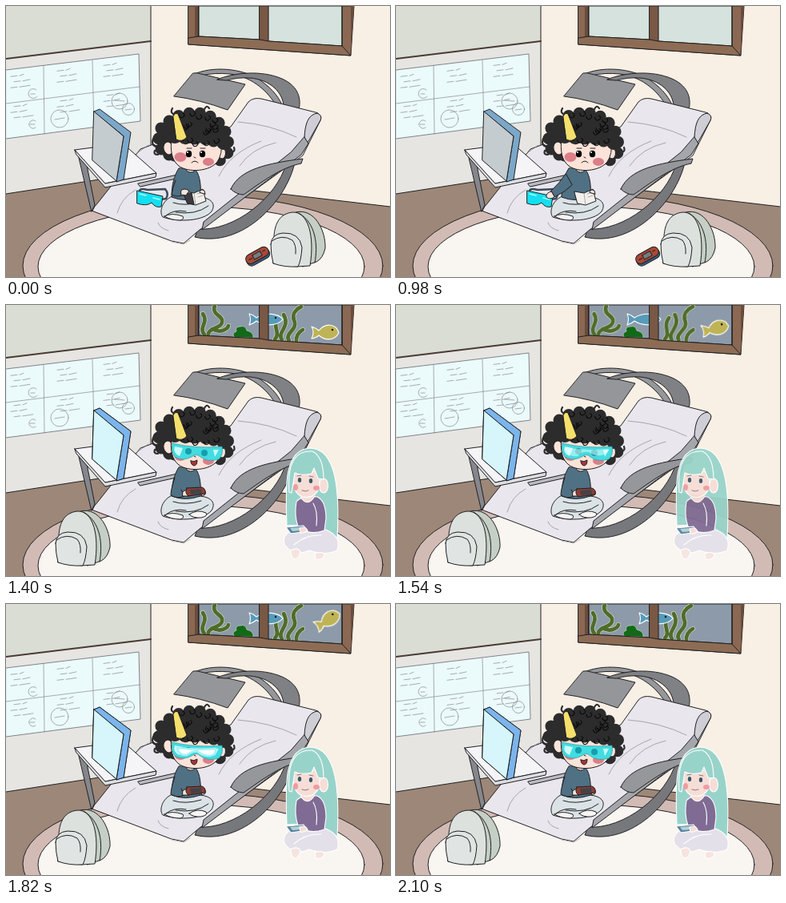
An HTML page that plays this animation: 480x339 px, repeating every 2.24 s.

```html
<!DOCTYPE html>
<html lang="en">
<head>
<meta charset="utf-8">
<title>Reading and playing</title>
<style>
html, body { margin: 0; width: 100%; height: 100%; overflow: hidden; background: #f8efe5; }
svg { display: block; width: 100vw; height: 100vh; }
path, ellipse, circle { stroke-linejoin: round; stroke-linecap: round; }
.ink { stroke: #202022; stroke-width: 1; }
.thin { stroke: #77777d; stroke-width: .6; fill: none; }
.none { fill: none; }
.glow { stroke: #fff; stroke-width: 1.1; }
.skin { fill: #fbe3d9; }
.shirt { fill: #507084; }
.pants { fill: #dbe3e7; }
.metal { fill: #96979b; }
.cloth { fill: #e9e7ed; }
.cyan { fill: #14dff0; }

/* One loop is 16 ticks of 140 ms, 6.25% each. */
.t { animation: 2240ms step-end infinite; }
.day { animation-name: day; }
.play { animation-name: play; }
.read { animation-name: read; }
.turn { animation-name: turn; }
.reach { animation-name: reach; }
.lift { animation-name: lift; }
.rest { animation-name: rest; }
.girl { animation-name: girl; }
.tap { animation-name: tap; }
.shine { animation-name: shine; }
.wide { animation-name: wide; }
.blue { animation-name: blue; }
.gold { animation-name: gold; }
.weed { animation-name: weed; transform-origin: 300px 40px; }
@keyframes day { 0% { opacity: 1 } 62.5%, 100% { opacity: 0 } }
@keyframes play { 0% { opacity: 0 } 62.5%, 100% { opacity: 1 } }
@keyframes read { 0% { opacity: 1 } 37.5%, 100% { opacity: 0 } }
@keyframes turn { 0% { opacity: 0 } 37.5% { opacity: 1 } 43.75%, 100% { opacity: 0 } }
@keyframes reach { 0% { opacity: 0 } 43.75% { opacity: 1 } 50%, 100% { opacity: 0 } }
@keyframes lift { 0% { opacity: 0 } 50% { opacity: 1 } 62.5%, 100% { opacity: 0 } }
@keyframes rest { 0% { opacity: 1 } 50%, 100% { opacity: 0 } }
@keyframes girl { 0% { opacity: 1 } 68.75% { opacity: .95 } 75% { opacity: .9 } 81.25%, 100% { opacity: 1 } }
@keyframes tap { 0% { transform: none } 68.75%, 87.5% { transform: translateY(1px) } 75%, 93.75%, 100% { transform: none } }
@keyframes shine { 0% { opacity: 0 } 68.75% { opacity: .5 } 75% { opacity: 1 } 81.25% { opacity: 0 } 87.5% { opacity: .5 } 93.75%, 100% { opacity: 0 } }
@keyframes wide { 0% { opacity: 0 } 81.25% { opacity: 1 } 87.5%, 100% { opacity: 0 } }
@keyframes blue {
  0%, 62.5%, 81.25%, 93.75%, 100% { transform: translate(325px, 18px) }
  68.75%, 87.5% { transform: translate(310px, 18px) }
  75% { transform: translate(294px, 18px) }
}
@keyframes gold {
  0%, 62.5% { transform: translate(399px, 34px) }
  68.75% { transform: translate(399px, 29px) rotate(-12deg) }
  75% { transform: translate(398px, 24px) rotate(-24deg) }
  81.25% { transform: translate(402px, 20px) rotate(-30deg) }
  87.5% { transform: translate(412px, 12px) rotate(-30deg) }
  93.75%, 100% { transform: translate(450px, 0) }
}
@keyframes weed {
  0%, 62.5%, 81.25%, 93.75%, 100% { transform: none }
  68.75%, 87.5% { transform: skewX(-3deg) }
  75% { transform: skewX(-6deg) }
}
</style>
</head>
<body>
<svg viewBox="0 0 480 339" preserveAspectRatio="none">
  <defs>
    <g id="bag" class="ink" stroke-width=".8">
      <path d="M362 258C386 252 400 282 399 303Q396 316 388 320L371 326Z" fill="#c5cfc5"/>
      <path d="M335 288C336 272 342 260 358 258C378 257 386 288 380 325L363 326L334 322Z" fill="#dde1dd"/>
      <path d="M366 259C388 272 390 300 386 321" class="none"/>
      <path d="M331 298Q332 285 346 284Q367 283 370 302Q369 318 365 326Q348 327 334 322Q331 310 331 298Z" fill="#e0e5e4"/>
      <path d="M332 294Q345 285 358 293Q363 299 362 310" class="none"/>
    </g>
    <path id="weeds" d="M248 37C240 28 254 22 246 11M253 38C251 28 272 30 270 19C269 12 257 13 261 0M258 30C268 36 277 30 278 26M336 43C344 35 332 27 340 16M345 44C338 34 356 28 347 12M354 45C347 35 366 31 360 19C357 11 363 5 369 2M363 46Q362 36 371 31"/>
    <path id="panes" d="M241 0H317V42L241 38ZM328 0H420V50L328 44Z"/>
    <clipPath id="glass"><use href="#panes"/></clipPath>
  </defs>

  <!-- Room -->
  <path d="M0 0H181V235H0Z" fill="#e6e5e2"/>
  <path d="M0 0H181V44L0 66Z" fill="#d9ddd4"/>
  <path d="M0 235L181 207L310 231L480 251V339H0Z" fill="#9d8778"/>
  <path d="M0 235L181 207M310 231L480 251M181 0V180" class="ink none"/>
  <path d="M0 66L181 44" stroke="#4a3a33" stroke-width="2"/>
  <ellipse cx="246" cy="325" rx="225" ry="88" fill="#d2bbb4" class="ink"/>
  <ellipse cx="244" cy="326" rx="204" ry="75" fill="#f9f5f1" class="ink"/>

  <!-- Wall chart -->
  <path d="M0 80L166 60L168 144L0 166Z" fill="#ebfafb" stroke="#55555c" stroke-width=".7"/>
  <path d="M47 75L48 160M108 68L110 152M0 122L167 101" class="thin"/>
  <g class="thin">
    <path d="M38 105a6 6 0 1 0 1 8M37 144a5 5 0 1 0 0 8"/>
    <circle cx="67" cy="141" r="11"/><circle cx="142" cy="119" r="10"/><circle cx="153" cy="129" r="7.5"/>
    <path d="M31 110h5M30 148h6M61 142l12-2M136 118l12 1M149 130l8-1"/>
  </g>
  <g id="notes" class="thin"></g>

  <!-- Window -->
  <path d="M228 0H435L431 62L228 48Z" fill="#8a6853" class="ink"/>
  <path d="M236 0H241V38L236 41ZM431 0H435L431 62Z" fill="#6b4c3c"/>
  <use href="#panes" fill="#d5e2dd" class="ink"/>
  <g class="t play">
    <use href="#panes" fill="#8d9aa9" class="ink"/>
    <g clip-path="url(#glass)">
      <g class="t weed" fill="none">
        <use href="#weeds" stroke="#dce2cf" stroke-width="6"/>
        <use href="#weeds" stroke="#4f6c2b" stroke-width="4.8"/>
      </g>
      <path d="M285 40Q282 35 288 33Q286 27 293 27Q299 25 301 32Q310 34 309 41Z" fill="#126a18" stroke="#dce2cf" stroke-width=".6"/>
      <g class="t gold">
        <path d="M-17 -7Q-11 -5 -8 -2C0 -12 14 -11 17 1C11 12 -1 10 -8 4Q-11 7 -17 8Q-13 0 -17 -7Z" fill="#bfb455" class="glow"/>
        <circle cx="9" cy="-3" r="1.2"/>
      </g>
    </g>
    <g class="t blue">
      <path d="M21 0C15 -8 -1 -9 -12 -2Q-16 -6 -21 -7Q-18 0 -21 7Q-15 5 -12 2C-1 9 15 8 21 0Z" fill="#569bb9" class="glow"/>
      <circle cx="12" cy="-2" r="1.2"/>
    </g>
  </g>
  <path d="M317 0H328V48L317 47Z" fill="#795844" class="ink"/>
  <path d="M228 40L241 38L317 42L328 44L420 50L431 62L228 48Z" fill="#8d6c55" class="ink"/>
  <path d="M420 0V50M241 0V38" class="ink"/>

  <!-- Rocking lounger -->
  <path d="M350 198C338 240 285 282 240 279L236 289C295 303 350 245 361 196Z" fill="#77787c" class="ink"/>
  <path d="M238 84C265 74 300 80 318 93C335 105 342 116 346 126L336 122C325 104 305 88 280 85Q260 83 245 87Z" class="metal ink"/>
  <path d="M234 84Q239 83 244 85L299 98L277 130Q242 117 210 113Z" fill="#95969a" class="ink"/>
  <path d="M264 92C285 83 320 80 345 91C363 99 370 113 366 130L347 125C346 108 330 92 305 90Q289 89 276 93Z" fill="#808185" class="ink"/>
  <path d="M108 256Q110 251 115 246L168 179L184 173L214 186L281 151L303 120Q309 114 319 116L387 133Q396 136 393 143L371 187L242 280L222 297L207 294Z" class="cloth ink"/>
  <path d="M389 134C377 136 374 148 373 164L376 173L393 143Q396 137 389 134Z" fill="#cfced6" class="ink"/>
  <path d="M373 164L378 172L369 186L245 280L247 270L356 183Z" fill="#a5a6ab" class="ink"/>
  <path d="M290 145Q330 148 363 164M266 213Q280 184 319 169M292 200Q307 178 337 171M139 259Q144 240 162 230M190 271Q192 278 203 281M154 191L178 174" class="thin"/>
  <path d="M165 222L214 211L217 215L168 226Z" fill="#babbc0" class="ink"/>
  <path d="M281 229C292 204 326 197 371 191L369 197C343 202 317 222 297 236Q288 236 281 229Z" class="metal ink"/>
  <path d="M207 295L222 298L230 293" stroke="#bbb3b2" fill="none"/>

  <!-- Table and screen -->
  <path d="M91 189L101 199L111 249L107 257Z" fill="#85878c" class="ink"/>
  <path d="M86 180L146 172L188 209L124 222Z" fill="#f5f5f7" class="ink"/>
  <path d="M86 180L124 222L188 209L187 214L124 227L88 186Z" fill="#dcdde1" class="ink"/>
  <g class="ink">
    <path d="M110 132L117 129L156 158L147 217L138 220L147 163Z" fill="#7ba8ca"/>
    <path d="M110 132L147 163L138 219L108 193Z" fill="#c4cccf"/>
    <g class="t play">
      <path d="M110 132L117 129L156 158L147 217L138 220L147 163Z" fill="#7bb5ec"/>
      <path d="M110 132L147 163L138 219L108 193Z" fill="#d6f6fb"/>
    </g>
  </g>

  <!-- Things lying around -->
  <g class="t day">
    <use href="#bag"/>
    <g transform="translate(314 313) rotate(-29)" class="ink">
      <rect x="-15" y="-5" width="31" height="13" rx="6" fill="#355d7a"/>
      <rect x="-15" y="-7" width="31" height="12" rx="6" fill="#a94835"/>
      <rect x="-5" y="-4" width="11" height="6" fill="#777b80"/>
      <path d="M-11 -1h4M9 -2h3" class="none"/>
    </g>
  </g>
  <g class="t play"><use href="#bag" x="-269"/></g>
  <g class="t rest">
    <path d="M167 233Q166 227 177 230L199 229Q204 235 200 241L194 242" fill="none" stroke="#3c4b5b" stroke-width="2.5"/>
    <path d="M164 231L196 238L194 251Q187 253 182 246Q176 251 164 247Z" class="cyan ink"/>
    <path d="M167 235l8 2M184 240l8 2" stroke="#adf9ff" stroke-width="1.5"/>
  </g>

  <!-- Boy -->
  <path d="M208 238C195 243 191 258 196 264C216 271 247 269 257 257C263 247 256 240 242 239Z" class="pants ink"/>
  <path d="M209 246Q224 251 244 245M212 258Q237 262 253 250M200 262Q210 254 225 257" class="ink none" stroke-width=".7"/>
  <path d="M198 263Q207 258 221 263Q223 267 218 268Q206 268 198 263Z" fill="#f7f5f3" class="ink"/>
  <path d="M216 203C210 212 207 225 207 239Q224 246 243 239C244 227 243 212 237 205Z" class="shirt ink"/>
  <path d="M225 205Q230 211 236 206" class="skin ink"/>
  <g class="t day">
    <path d="M223 232L235 234L246 229L250 244L237 249L227 247Z" fill="#f3efeb" class="ink"/>
    <path d="M235 234L237 249M239 235l6-2M240 239l6-2" class="thin"/>
    <path d="M242 233Q243 228 248 231L249 235Z" class="skin ink"/>
    <g class="t read">
      <path d="M222 235L232 234L235 248L227 247Z" fill="#3e3b40" class="ink"/>
      <path d="M212 218Q208 228 207 236Q214 240 223 236L220 230" class="shirt ink"/>
      <path d="M219 231Q222 227 229 231L225 237L219 236Z" class="skin ink"/>
    </g>
    <g class="t turn">
      <path d="M212 218Q208 228 207 238Q215 243 222 240L220 233" class="shirt ink"/>
      <path d="M220 234Q226 232 228 237Q225 242 220 240Z" class="skin ink"/>
    </g>
    <g class="t reach">
      <path d="M212 210Q205 221 193 232L198 239Q211 233 220 224Z" class="shirt ink"/>
      <path d="M194 232Q187 234 188 239Q192 243 198 239Z" class="skin ink"/>
    </g>
  </g>
  <g class="t play">
    <path d="M211 216Q206 231 206 238Q214 243 223 239L219 231" class="shirt ink"/>
    <path d="M221 234Q225 229 229 234L229 239L221 239Z" class="skin ink"/>
    <path d="M244 232Q251 230 249 237L245 239Z" class="skin ink"/>
    <g class="t tap">
      <path d="M226 229L245 228Q250 230 249 236L228 239Q223 235 226 229Z" fill="#8f3d33" class="ink"/>
      <path d="M230 231L244 230L245 236L231 237Z" fill="#454247"/>
    </g>
    <path d="M229 262Q239 255 250 260Q253 264 244 266Q234 267 229 262Z" fill="#f7f5f3" class="ink"/>
  </g>

  <g fill="#2d2c2d" stroke="#2d2c2d">
    <path d="M203 144C220 131 251 129 264 143C278 151 282 175 276 187Q267 201 253 196H218Q195 192 192 178C187 160 188 150 203 144Z"/>
    <path d="M204 144C222 131 249 130 263 144C278 153 280 177 276 186Q270 193 263 194M204 144C190 152 188 163 194 178Q194 186 204 186" fill="none" stroke-width="15" stroke-dasharray="0 13.5"/>
    <path d="M213 136Q204 135 208 128M248 129Q251 123 254 128M281 183Q287 183 285 177M188 176Q181 174 184 166M190 186Q184 186 186 181" fill="none" stroke-width="2.2"/>
  </g>
  <ellipse cx="203" cy="178" rx="6" ry="8" class="skin ink" transform="rotate(-15 203 178)"/>
  <ellipse cx="270" cy="184" rx="4.5" ry="7" class="skin ink"/>
  <path d="M207 164C205 181 207 193 216 200C228 209 255 207 264 195Q271 185 269 169Z" class="skin ink"/>
  <g fill="#db7f89">
    <ellipse cx="218" cy="189" rx="7.5" ry="6"/><ellipse cx="253" cy="195" rx="7" ry="5"/>
  </g>
  <path d="M235 189l2 1" class="ink"/>
  <path d="M203 161Q229 140 272 162L273 180Q267 180 264 175Q258 179 253 173Q247 176 243 171Q235 176 230 171Q223 176 217 170Q211 174 205 170Z" fill="#2d2c2d"/>
  <g id="curls" fill="none" stroke="#09090a" stroke-width="1.1"></g>
  <path d="M209 138Q211 133 215 135L226 164Q220 171 213 167Z" fill="#f6e06c" class="ink"/>

  <g class="t day">
    <ellipse cx="228.5" cy="185" rx="3.7" ry="4.3"/><ellipse cx="245.5" cy="185" rx="3.7" ry="4.3"/>
    <circle cx="227" cy="183" r="1" fill="#fff"/><circle cx="244" cy="183" r="1" fill="#fff"/>
    <path d="M226 178L232 178M243 178L249 178" class="ink" stroke-width="1.4"/>
    <path d="M232 196Q236 192 240 196" class="ink none"/>
    <g class="t lift">
      <path d="M208 199Q230 204 254 199L251 215Q241 218 231 212Q221 219 211 214Z" class="cyan ink"/>
      <path d="M212 214Q204 224 203 236Q207 242 216 238L232 219L226 213Z" class="shirt ink"/>
      <path d="M223 216Q225 207 230 208L236 207Q237 215 230 219Z" class="skin ink"/>
    </g>
  </g>
  <g class="t play">
    <path d="M231 195Q235 197 239 194Q239 201 235 201Q231 200 231 195Z" fill="#a8343c" class="ink" stroke-width=".8"/>
    <path d="M208 173Q237 180 270 177Q272 187 266 193Q252 197 243 190Q238 185 232 190Q221 196 211 190Q206 182 208 173Z" fill="#43dce0" stroke="#2c9ba5" stroke-width=".7"/>
    <g fill="#159eae"><circle cx="228" cy="183" r="4"/><circle cx="248" cy="185" r="4"/></g>
    <path d="M211 177L221 179L217 189Q208 185 211 177ZM259 181L266 181L261 190Z" fill="#c9fcfb"/>
    <path class="t shine" d="M211 178Q238 183 266 180Q266 186 257 188Q247 189 241 184Q232 183 227 189Q215 191 211 178Z" fill="#effeff"/>
    <path class="t wide" d="M214 180Q239 183 262 181Q263 189 255 190Q245 190 239 184Q232 184 226 189Q216 190 214 180Z" fill="#fff" stroke="#a5f1f5" stroke-width="2.5"/>
  </g>

  <!-- Girl -->
  <g class="t play">
    <g class="t girl glow">
      <path d="M351 276C350 235 345 181 380 179C414 180 417 235 414 291Q399 294 388 284L371 275Z" fill="#98d3ca"/>
      <path d="M349 301C343 290 355 278 374 278L397 280Q420 288 414 307Q399 314 379 307Q362 315 349 301Z" fill="#e4e0e9"/>
      <path d="M356 307Q365 302 368 309Q366 318 361 318Q356 317 356 307ZM386 311Q398 307 398 314Q394 320 387 318Z" fill="#f6e4df"/>
      <path d="M363 246Q369 238 389 240Q400 245 400 267L398 282Q378 289 365 277Q360 263 363 246Z" fill="#806b94"/>
      <path d="M368 240Q377 254 386 239" fill="#f6ddd6"/>
      <ellipse cx="397" cy="226" rx="5.5" ry="9" fill="#f6ddd6"/>
      <path d="M358 208H392V228Q386 243 371 240Q357 236 358 208Z" fill="#f6ddd6"/>
      <path d="M354 234C351 192 365 182 383 183Q397 190 397 218L390 217L385 204L382 211Q369 214 361 210L357 235Z" fill="#98d3ca"/>
      <path d="M384 248Q390 258 388 276M360 300Q374 287 394 288" class="none"/>
      <g stroke="none">
        <ellipse cx="367" cy="219" rx="2.2" ry="3" fill="#34566a"/><ellipse cx="381" cy="220" rx="2.2" ry="3" fill="#34566a"/>
        <ellipse cx="362" cy="228" rx="3" ry="4" fill="#ef9ba2"/><ellipse cx="388" cy="229" rx="4" ry="3" fill="#ef9ba2"/>
      </g>
      <path d="M370 232Q374 234 378 232M364 214l5-1M379 214l5 1" class="none" style="stroke:#725e65;stroke-width:.8"/>
      <g class="t tap">
        <path d="M350 278L372 276L377 283L356 286Z" fill="#5683a5"/>
        <path d="M355 279L368 278L371 282L358 283Z" fill="#b3d1ce" stroke="none"/>
        <path d="M367 279Q374 276 377 282Q373 286 368 285Z" fill="#f6ddd6"/>
      </g>
    </g>
  </g>
</svg>
<script>
const addPath = (id, d) => {
  const path = document.createElementNS("http://www.w3.org/2000/svg", "path");
  path.setAttribute("d", d);
  document.getElementById(id).append(path);
};

// Handwritten lines, three columns by two rows along the tilted chart.
for (let i = 0; i < 18; i++) {
  const col = i % 3, row = Math.floor(i / 3);
  const x = 6 + col * 58 + row % 2 * 4;
  const y = 89 + row * 7 + (row > 2 ? 17 : 0) - x * .12;
  addPath("notes", `M${x} ${y}l8-1m3 0l${5 + row % 3 * 4}-2`);
}

// Hair curls in loose rings.
for (let i = 0; i < 22; i++) {
  const a = i * 2.4, r = .35 + i % 4 * .2;
  const x = 235 + 43 * r * Math.cos(a), y = 153 + 20 * r * Math.sin(a);
  addPath("curls", `M${x} ${y}q1 5 5 3q4-3 0-5`);
}
</script>
</body>
</html>
```
